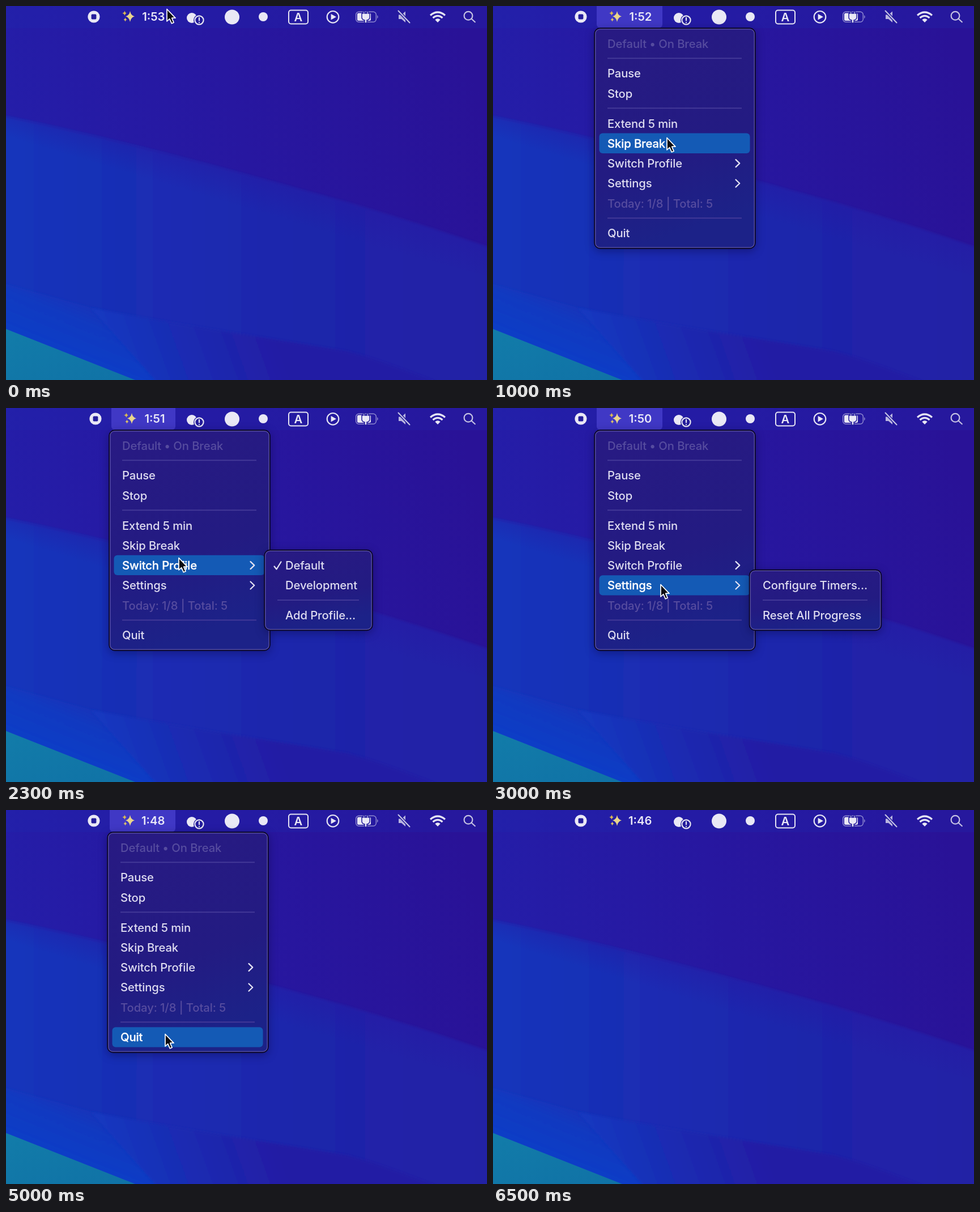
These frames come from a looping animation (849x660 px, 6600 ms). An HTML page:

```html
<!DOCTYPE html>
<html lang="en">
<head>
<meta charset="utf-8">
<title>Break timer menu</title>
<style>
html, body { margin: 0; width: 100%; height: 100%; overflow: hidden; background: #2617a0; }
svg { display: block; width: 100%; height: 100%; }
text { font: 500 20.3px Inter, "Liberation Sans", sans-serif; letter-spacing: -.12px; fill: #dedcf0; white-space: pre; }
.off { fill: #564c9f; }
.hot { fill: #fff; stroke: #fff; stroke-width: .3; }
.clock { font-weight: 600; letter-spacing: 0; fill: #e9e8f7; }
.line { fill: none; stroke: #e4e3f3; stroke-width: 2.2; stroke-linecap: round; stroke-linejoin: round; }
.solid { fill: #e9e8f5; }
.panel { filter: drop-shadow(0 4px 8px rgba(5, 0, 50, .38)); }
</style>
</head>
<body>
<svg id="stage" viewBox="0 0 849 660" preserveAspectRatio="none">
  <defs>
    <linearGradient id="sky" x1="0" y1=".5" x2="1" y2=".3">
      <stop offset="0" stop-color="#241ea9"/><stop offset=".5" stop-color="#2717a0"/><stop offset="1" stop-color="#291297"/>
    </linearGradient>
    <linearGradient id="band">
      <stop offset="0" stop-color="#1536bc"/><stop offset=".3" stop-color="#1a2db4"/>
      <stop offset=".65" stop-color="#1f25aa"/><stop offset="1" stop-color="#2221a5"/>
    </linearGradient>
    <linearGradient id="fold" gradientUnits="userSpaceOnUse" x1="190" y1="660" x2="470" y2="560">
      <stop offset="0" stop-color="#1239c1"/><stop offset=".5" stop-color="#1b2ab1"/><stop offset="1" stop-color="#241ca4"/>
    </linearGradient>
    <linearGradient id="glow" gradientUnits="userSpaceOnUse" x1="60" y1="590" x2="105" y2="480">
      <stop offset="0" stop-color="#103dc6"/><stop offset=".5" stop-color="#123bc2" stop-opacity=".8"/>
      <stop offset="1" stop-color="#1635bb" stop-opacity="0"/>
    </linearGradient>
    <linearGradient id="edge" gradientUnits="userSpaceOnUse" x1="430" y1="305" x2="415" y2="355">
      <stop offset="0" stop-color="#2619a4" stop-opacity=".45"/><stop offset="1" stop-color="#2619a4" stop-opacity="0"/>
    </linearGradient>
    <linearGradient id="teal" x2="1" y2="1">
      <stop offset="0" stop-color="#127ca9"/><stop offset="1" stop-color="#1072a6"/>
    </linearGradient>
    <linearGradient id="glass" x2=".25" y2="1">
      <stop offset="0" stop-color="#281a83"/><stop offset=".65" stop-color="#231b82"/><stop offset="1" stop-color="#1c2288"/>
    </linearGradient>
    <filter id="soft" x="-10%" y="-10%" width="120%" height="120%"><feGaussianBlur stdDeviation="2"/></filter>
  </defs>

  <rect width="849" height="660" fill="url(#sky)"/>
  <path d="M-20 191C200 235 420 296 600 346Q730 384 870 432V690H-20Z" fill="url(#band)" filter="url(#soft)"/>
  <path d="M-20 191C200 235 420 296 600 346Q730 384 870 432V482L-20 246Z" fill="url(#edge)"/>
  <path d="M-20 485L170 538L300 690H-20Z" fill="url(#glow)" filter="url(#soft)"/>
  <path d="M150 533Q300 561 440 583L600 609Q655 622 770 668H270Z" fill="url(#fold)" filter="url(#soft)"/>
  <path d="M0 570L228 660H0Z" fill="url(#teal)"/>
  <rect width="849" height="39" fill="#1c2bb0" opacity=".25"/>

  <rect id="barHot" y="-8" height="46.5" rx="6" fill="#4038c5"/>
  <g id="status">
    <circle class="solid" cx="155" cy="19" r="10.6"/>
    <rect x="150.6" y="14.6" width="8.8" height="8.8" rx="1.6" fill="#251d9b"/>
    <path d="M219 9Q220.5 17 227 18.3Q220.5 19.8 219 28Q217.5 19.8 211 18.3Q217.5 17 219 9Z" fill="#e9d58c"/>
    <path d="M209.5 8.5Q210.2 12 213 12.7Q210.2 13.5 209.5 17Q208.8 13.5 205 12.7Q208.8 12 209.5 8.5Z" fill="#d9b854"/>
    <path d="M210.5 20.5Q211 23.5 213.5 24Q211 24.7 210.5 27.5Q210 24.7 207.5 24Q210 23.5 210.5 20.5Z" fill="#e0c566"/>
  </g>
  <text id="clock" class="clock" x="280.5" y="25.5" text-anchor="end"></text>

  <circle class="solid" cx="328" cy="21" r="9"/>
  <circle cx="341" cy="25" r="10" fill="#241c9c"/>
  <circle class="line" cx="341" cy="25" r="7.6"/>
  <path class="line" d="M341 20.8V25.5M341 29.1V29.2"/>
  <circle class="solid" cx="399" cy="19.5" r="13"/>
  <circle class="solid" cx="454" cy="19" r="8"/>
  <rect class="line" x="499" y="7.5" width="34" height="24" rx="4" style="stroke-width:2"/>
  <text class="clock" x="516" y="26.8" text-anchor="middle">A</text>
  <circle class="line" cx="577" cy="19.3" r="10.3"/>
  <path class="solid" d="M573.6 14L583 19.3L573.6 24.6Z"/>
  <g id="battery">
    <rect x="617.7" y="10.2" width="35.6" height="18" rx="5" fill="none" stroke="#8d88cf" stroke-width="1.5"/>
    <path d="M655 16Q658.5 19.2 655 22.4Z" fill="#8d88cf"/>
    <rect class="solid" x="620" y="12.5" width="24" height="13.4" rx="2.5"/>
    <path class="solid" d="M630.5 9V13H628V20Q628 24 633 25V30H637V25Q642 24 642 20V13H639.5V9H637V13H633V9Z" stroke="#241c9c" stroke-width="1.5"/>
  </g>
  <path d="M693 15.5H698L705 9.5V29L698 23H693Z" fill="#b9b5df"/>
  <path d="M692.5 8.5L712.5 29.5" stroke="#241c9c" stroke-width="5"/>
  <path d="M692.5 8.5L712.5 29.5" stroke="#c8c5e6" stroke-width="2" stroke-linecap="round"/>
  <path class="line" style="stroke-width:3.2;stroke-linecap:butt" d="M749 16.5Q762 5.5 775 16.5M753.5 21Q762 13.8 770.5 21"/>
  <path class="solid" d="M757.3 24.2Q762 20.5 766.7 24.2L762 29Z"/>
  <path class="line" style="stroke:#c4c1e2" d="M821.5 22.5L827.8 28.3"/>
  <circle class="line" style="stroke:#c4c1e2" cx="816" cy="17.3" r="7.4"/>

  <g id="menu"></g>
  <path id="cursor" d="M1 1.5V23L5.7 18.6L9.4 26.8L13.1 25.2L9.7 17.2H16Z" fill="#0b0b12" stroke="#fff" stroke-width="1.7" stroke-linejoin="round"/>
</svg>
<script>
const LOOP = 6600, STEP = 100;
const $ = id => document.getElementById(id);

function add(parent, tag, attrs, label) {
  const el = document.createElementNS("http://www.w3.org/2000/svg", tag);
  for (const key in attrs) el.setAttribute(key, attrs[key]);
  if (label) el.textContent = label;
  return parent.appendChild(el);
}

const show = (el, on) => { el.style.display = on ? "" : "none"; };

function panel(parent, x, y, w, h) {
  const g = add(parent, "g", {});
  const box = (inset, r, style) =>
    add(g, "rect", { x: x + inset, y: y + inset, width: w - 2 * inset, height: h - 2 * inset, rx: r, ...style });
  box(-.7, 9.5, { class: "panel", fill: "url(#glass)", stroke: "#0a0626", "stroke-width": 2 });
  box(.8, 8, { fill: "none", stroke: "#5d54a6", "stroke-width": 1.3 });
  return g;
}

const label = (g, x, mid, text, cls = "") => add(g, "text", { x, y: mid + 7.3, class: cls }, text);
const rule = (g, x, y, w) => add(g, "rect", { x, y: y - .9, width: w, height: 1.8, fill: "#453b99" });

const menu = $("menu");
const main = panel(menu, 180, 40, 282, 387);
const bar = add(main, "rect", { x: 187.5, width: 266, height: 35.3, rx: 6, fill: "#145ab5" });
[92.3, 180.3, 374.3].forEach(y => rule(main, 202, y, 237));
label(main, 202, 66.3, "Default • On Break", "off");
label(main, 202, 348.3, "Today: 1/8 | Total: 5", "off");
const items = [
  ["Pause", 119], ["Stop", 154.5], ["Extend 5 min", 207.3], ["Skip Break", 242.4],
  ["Switch Profile", 277.6], ["Settings", 313], ["Quit", 401]
].map(([text, mid]) => ({ mid, el: label(main, 202, mid, text) }));
for (const mid of [277.6, 313])
  add(main, "path", { class: "line", d: `M428.5 ${mid - 6.5}l6.8 6.5l-6.8 6.5` });

const profiles = panel(menu, 454, 251.5, 189, 140);
add(profiles, "path", { class: "line", d: "M470.5 279.5l4 5l8-13" });
label(profiles, 490, 277.6, "Default");
label(profiles, 490, 313, "Development");
rule(profiles, 476, 339, 144);
label(profiles, 490, 366, "Add Profile...");

const settings = panel(menu, 453.5, 286.5, 231, 105);
label(settings, 476, 313, "Configure Timers...");
rule(settings, 476, 339, 185);
label(settings, 476, 366, "Reset All Progress");

// time, x, y of the pointer tip
const path = [
  [0, 283, 4], [400, 283, 6], [600, 292, 60], [800, 300, 170], [1000, 306, 231],
  [1400, 306, 240], [1600, 304, 262], [2300, 304, 263], [2500, 302, 270], [2700, 297, 300],
  [3000, 295, 310], [4100, 295, 317], [4300, 293, 325], [4700, 282, 385], [5000, 280, 394],
  [5700, 280, 397], [6000, 281, 407], [6200, 281, 408], [6500, 300, 690]
];

function pointer(t) {
  let i = 1;
  while (i < path.length - 1 && path[i][0] < t) i++;
  const [t0, x0, y0] = path[i - 1], [t1, x1, y1] = path[i];
  const k = Math.min(1, (t - t0) / (t1 - t0));
  return [x0 + (x1 - x0) * k, y0 + (y1 - y0) * k];
}

function draw(t) {
  const open = t >= 300 && t < 6400;
  const seconds = 53 - Math.floor((t + 600) / 1000);
  const shift = seconds === 51 ? 3 : 0; // the narrower clock moves the status item
  const move = `translate(${shift} 0)`;
  $("clock").textContent = "1:" + seconds;
  $("status").setAttribute("transform", move);
  menu.setAttribute("transform", move);
  $("barHot").setAttribute("x", 183 + shift);
  $("barHot").setAttribute("width", 116 - shift);
  show($("barHot"), open);
  show(menu, open);
  menu.style.opacity = t < 6200 ? 1 : Math.max(0, 1 - (t - 6100) / 300);

  const [x, y] = pointer(t);
  $("cursor").setAttribute("transform", `translate(${x} ${y})`);
  const hot = items.find(item => Math.abs(y - item.mid) < 17.7);
  items.forEach(item => item.el.setAttribute("class", item === hot ? "hot" : ""));
  show(bar, hot);
  if (hot) bar.setAttribute("y", hot.mid - 17.8);
  show(profiles, t >= 1700 && t < 2700);
  show(settings, t >= 2900 && t < 4500);
}

function tick() {
  const t = performance.now() % LOOP;
  draw(Math.floor(t / STEP) * STEP);
  requestAnimationFrame(tick);
}
tick();
</script>
</body>
</html>
```
